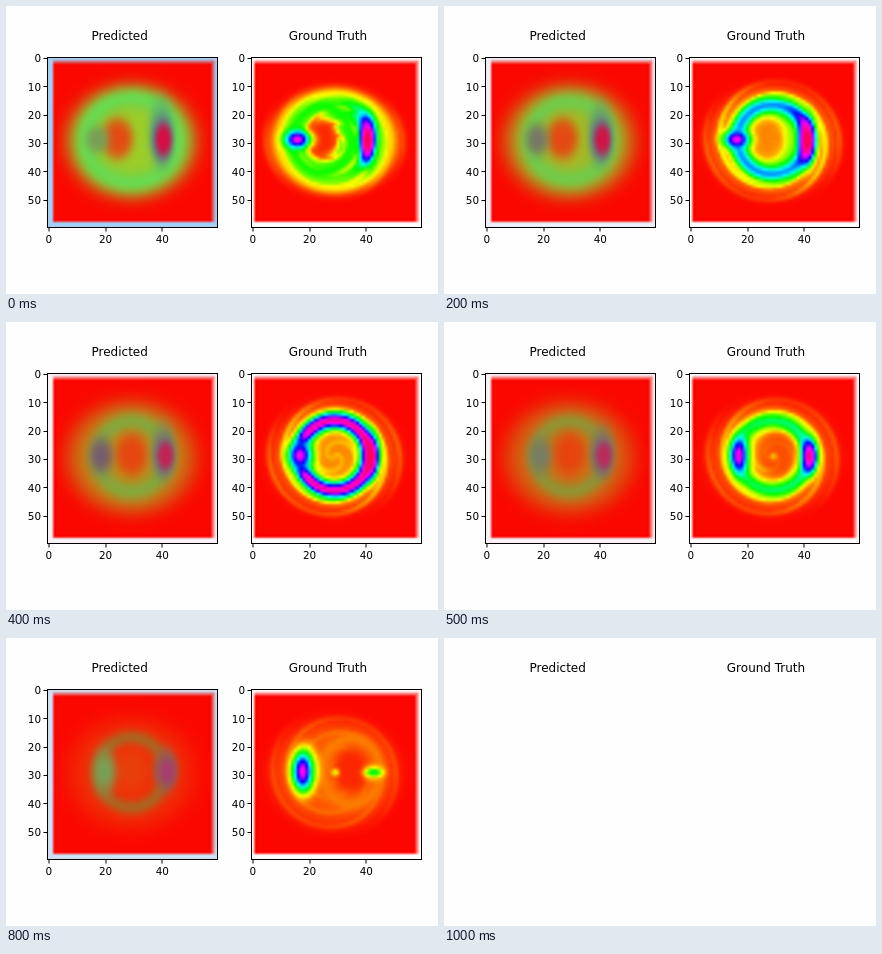
These frames come from a looping animation (432 px wide and 288 px high, 1.16 s). An HTML page with a canvas:

```html
<!DOCTYPE html>
<html lang="en">
<head>
<meta charset="utf-8">
<title>Predicted and Ground Truth</title>
<style>
  html, body { margin: 0; width: 432px; height: 288px; overflow: hidden; background: #fefefe; }
  canvas { display: block; }
</style>
</head>
<body>
<canvas id="stage" width="432" height="288"></canvas>
<script>
const ctx = document.getElementById('stage').getContext('2d');
const N = 60, SIZE = 170, CELL = SIZE / N, MID = 83;
const LOOP = 1160, STEP = 100, BLANK = 10;
const FONT = '"DejaVu Sans", sans-serif';

const clamp = v => Math.max(0, Math.min(1, v));
const ease = v => clamp(v) ** 2 * (3 - 2 * clamp(v));
const bump = (s, at, width) => Math.exp(-(((s - at) / width) ** 2));
const fall = (s, at) => 1 / (1 + Math.exp(2.5 * (s - at)));
const mix = (a, b, t) => a.map((v, i) => v + (b[i] - v) * t);

// Soft ellipse; a higher p hardens the edge, bend pulls the tips to the right.
const blob = (cx, cy, rx, ry, p = 1, bend = 0) => (x, y) => {
  const v = y - cy, u = x - cx - bend * v * v;
  return Math.exp(-(((u / rx) ** 2 + (v / ry) ** 2) ** p));
};

// Soft band along an ellipse, optionally faded away from an angle.
const arc = (cx, cy, rx, ry, width, angle = 0, span = 0) => (x, y) => {
  const u = (x - cx) / rx, v = (y - cy) / ry;
  const off = (Math.hypot(u, v) - 1) * (rx + ry) / 2 / width;
  const turn = span ? (Math.atan2(v, u) - angle) / span : 0;
  return Math.exp(-off * off - turn * turn);
};

// Two spiral arms that widen clockwise.
const arms = (disc, phase) => (x, y) => {
  const u = x - MID, v = y - MID;
  return disc(x, y) * clamp(Math.cos(0.42 * Math.hypot(u, v) - 2 * Math.atan2(v, u) + phase));
};

// The measured field as a single value on the hue scale.
function truth(s) {
  const young = bump(s, 0, 1.6), ringed = bump(s, 1.7, 0.75);
  const late = 1 - fall(s, 2.5), tall = bump(s, 3.2, 1);
  const disc = blob(MID, MID + 1, 64, 55 - 5 * Math.exp(-2 * s), 4);
  const core = 54 - 10 * ease(s);
  const eye = 70 + 7.5 * s;
  const leftX = 46 + 1.3 * s, rightX = 116 + 1.6 * s;
  const rx = 9 - 4 * tall, ry = 7 + 14 * tall, bend = 0.006 * bump(s, 3, 0.7);
  return [
    [disc, 0.05 + 0.11 * Math.exp(-s)],
    [blob(MID, MID, core, core - 5, 4), 0.06 + 0.22 * young],
    [arms(disc, 3.7 + 0.8 * (s - 2)), 0.07 + 0.12 * bump(s, 1.2, 1.5), 0.9],
    [arc(eye, 82, 29, 33, 6), 0.08 + 0.24 * young],
    [arc(84, 82, 33, 37, 7, -0.2, 0.8), 0.64, fall(s, 1.6)],
    [arc(MID, 82, 35, 35, 8), 1.03, ringed],
    [blob(eye, 81, 18, 22, 3), 0.025 + 0.06 * ringed, 1 - 0.6 * ringed],
    [blob(leftX + 2, 81, rx * 2.2, ry * 1.7, 2, bend), 0.17, late],
    [blob(leftX, 82, rx * 1.7, ry * 1.4, 1.5, bend), 0.42],
    [blob(leftX, 82, rx, ry, 1, bend), 0.86],
    [blob(rightX, 83, 12, 9, 2), 0.13, late],
    [blob(rightX, 83, 8, 3 + 19 * fall(s, 2.9), 1.3), 0.95, fall(s, 3.6)],
    [blob(84, 83, 3.5, 3.5), 0.2, late]
  ];
}

// The blurred forecast as colours.
function guess(s) {
  const age = ease(s / 4.5), settle = ease(s / 2), dusk = bump(s, 1.7, 0.9);
  const r = 46 - 12 * settle, rightX = 115 + s;
  const fade = (from, to) => mix(from, to, age);
  return [
    [blob(84, 84, 64, 56, 3), fade([155, 205, 40], [243, 42, 5])],
    [arc(84, 83, r, r - 4 + 5 * settle, 11 - 4 * age), fade([105, 218, 78], [175, 95, 30])],
    [blob(70 + 14 * settle, 81, 16, 21, 2), fade([228, 75, 18], [232, 62, 10])],
    [blob(50 + 1.8 * s, 82, 12, 14 + 2 * s, 1.5), mix([120, 160, 85], [118, 85, 112], dusk)],
    [blob(rightX - 1, 76 + s, 13, 34 - 3 * s, 2), fade([92, 175, 112], [168, 90, 58])],
    [blob(rightX, 82, 11, 23 - s, 2), [105, 80, 145], 0.75 - 0.4 * age],
    [blob(rightX + 1, 82, 8, 16 - s, 2), fade([215, 12, 65], [165, 65, 110])]
  ];
}

function field(base, layers, paint, rim, lead) {
  const pic = document.createElement('canvas');
  pic.width = pic.height = N;
  const g = pic.getContext('2d');
  const img = g.createImageData(N, N);
  for (let n = 0; n < N * N; n++) {
    const i = n % N, j = Math.floor(n / N);
    const x = (i + 0.5) * CELL, y = (j + 0.5) * CELL;
    let cell = base;
    for (const [shape, to, power = 1] of layers) cell = mix(cell, [].concat(to), shape(x, y) * power);
    const edge = clamp(Math.max(lead - i, i - 57.5, 1.5 - j, j - 57));
    img.data.set([...mix(paint(cell), rim, edge), 255], n * 4);
  }
  g.putImageData(img, 0, 0);
  return pic;
}

const hue = ([v]) => {
  const h = v * 6;
  return [Math.abs(h - 3) - 1, 2 - Math.abs(h - 2), 2 - Math.abs(h - 4)].map(c => clamp(c) * 252);
};

const frames = Array.from({ length: BLANK }, (_, k) => {
  const s = k / 2;
  const sky = Math.cos(Math.PI * s / 4) ** 6 * (1 - s / 8);
  const rim = mix([246, 239, 243], [165, 205, 242], sky);
  return [
    field([250, 8, 0], guess(s), c => c, rim, 2),
    field([0.004], truth(s), hue, [253, 250, 252], 1)
  ];
});

function text(str, x, y, size, align) {
  ctx.font = size + 'px ' + FONT;
  ctx.textAlign = align;
  ctx.fillText(str, x, y);
}

function panel(pic, x, y) {
  ctx.drawImage(pic, x, y, SIZE, SIZE);
  ctx.strokeRect(x, y, SIZE, SIZE);
  for (let n = 0; n < N; n += 10) {
    const d = (n + 0.5) * CELL;
    ctx.fillRect(x - 4, Math.round(y + d) - 1, 3.5, 1);
    text(n, x - 6.5, Math.round(y + d + 3.3), 10.4, 'right');
    if (n % 20) continue;
    ctx.fillRect(Math.round(x + d) - 0.5, y + SIZE + 0.5, 1, 3.5);
    text(n, x + d, y + SIZE + 15.5, 10.4, 'center');
  }
}

function draw(now) {
  const k = Math.min(BLANK, Math.floor((now % LOOP) / STEP));
  ctx.fillStyle = '#fefefe';
  ctx.fillRect(0, 0, 432, 288);
  ctx.fillStyle = '#000';
  text('Predicted', 113.7, 34, 12, 'center');
  text('Ground Truth', 322, 34, 12, 'center');
  if (k < BLANK) {
    panel(frames[k][0], 41.5, 51.5);
    panel(frames[k][1], 245.5, 51.5);
  }
  requestAnimationFrame(draw);
}

ctx.imageSmoothingQuality = 'high';
draw(0);
</script>
</body>
</html>
```
